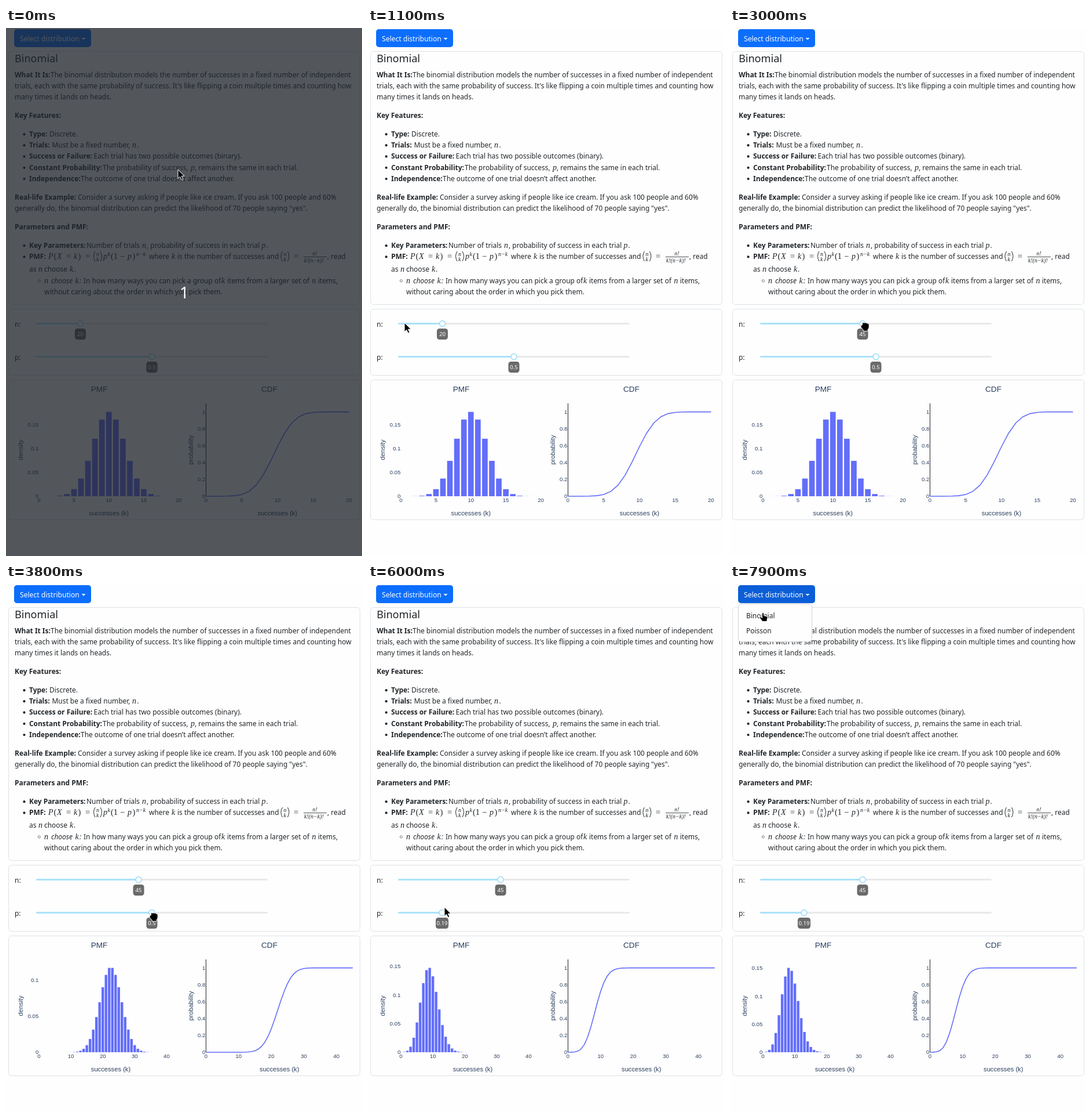
These frames come from a looping animation (615x910 px, 8000 ms). An HTML page:

```html
<!DOCTYPE html>
<html lang="en">
<head>
<meta charset="utf-8">
<title>Binomial distribution explorer</title>
<style>
html, body { margin: 0; width: 100%; height: 100%; overflow: hidden; background: #fefefe; }
svg { display: block; width: 615px; height: 910px; }
text { font: 11.95px "Noto Sans", sans-serif; fill: #212529; }
.b { font-weight: 700; }
.i { font-style: italic; }
.h { font-size: 18.1px; }
.w { fill: #fff; font-size: 12.1px; }
.m { font: italic 14px "Liberation Serif", serif; }
.r { font: 14.5px "Liberation Serif", serif; }
.s { font: italic 10px "Liberation Serif", serif; }
.tip { font-size: 9.6px; fill: #fff; text-anchor: middle; }
.tick, .axis, .title { font: 9.6px "Liberation Sans", Arial, sans-serif; fill: #2a3f5f; text-anchor: middle; }
.end { text-anchor: end; }
.axis { font-size: 11.2px; }
.title { font-size: 13.6px; }
.count { font-size: 28px; fill: #fff; text-anchor: middle; }
.card { fill: none; stroke: #dee2e6; }
</style>
</head>
<body>
<svg viewBox="0 0 615 910"><g id="page"></g><g id="live"></g></svg>
<script>
const text = (x, y, s, cls = '', extra = '') => `<text x="${x}" y="${y}" class="${cls}" ${extra}>${s}</text>`;
const rect = (x, y, w, h, attrs) => `<rect x="${x}" y="${y}" width="${w}" height="${h}" ${attrs}/>`;
const path = (d, attrs) => `<path d="${d}" ${attrs}/>`;
const card = (y, h) => rect(4.5, y + .5, 607, h, 'rx="5" class="card"');

// A line is a list of [x, string, class] runs on one baseline.
const line = (y, ...runs) => runs.map(([x, s, c]) => text(x, y, s, c)).join('');
const bullet = y => `<circle cx="31.5" cy="${y - 3.8}" r="2.1" fill="#212529"/>`;
const item = (y, ...runs) => bullet(y) + line(y, ...runs);
const choose = (x, y) =>
  path(`M${x + 4} ${y - 13}q-5 8 0 17M${x + 13} ${y - 13}q5 8 0 17`, 'fill="none" stroke="#212529"') +
  line(y - 5, [x + 6, 'n', 's']) + line(y + 4, [x + 6, 'k', 's']);

function article() {
  return text(15, 59, 'Binomial', 'h') +
    line(84.6, [15, 'What It Is:', 'b'], [77, 'The binomial distribution models the number of successes in a fixed number of independent']) +
    line(103.8, [15, "trials, each with the same probability of success. It's like flipping a coin multiple times and counting how"]) +
    line(123, [15, 'many times it lands on heads.']) +
    line(155, [15, 'Key Features:', 'b']) +
    item(187, [40, 'Type:', 'b'], [75, 'Discrete.']) +
    item(206, [40, 'Trials:', 'b'], [79.5, 'Must be a fixed number,'], [218, 'n', 'm'], [226.5, '.']) +
    item(225.2, [40, 'Success or Failure:', 'b'], [151.5, 'Each trial has two possible outcomes (binary).']) +
    item(244.6, [40, 'Constant Probability:', 'b'], [167, 'The probability of success,'], [319, 'p', 'm'],
      [326, ', remains the same in each trial.']) +
    item(263.8, [40, 'Independence:', 'b'], [129, 'The outcome of one trial doesn’t affect another.']) +
    line(296, [15, 'Real-life Example:', 'b'], [124, 'Consider a survey asking if people like ice cream. If you ask 100 people and 60%']) +
    line(315, [15, 'generally do, the binomial distribution can predict the likelihood of 70 people saying "yes".']) +
    line(347, [15, 'Parameters and PMF:', 'b']) +
    item(379, [40, 'Key Parameters:', 'b'], [139, 'Number of trials'], [235, 'n', 'm'],
      [243, ', probability of success in each trial'], [441.5, 'p', 'm'], [449.5, '.']) +
    item(398.2, [40, 'PMF:', 'b'], [73, 'P', 'm'], [82.5, '(', 'r'], [88, 'X', 'm'], [104, '=', 'r'], [117, 'k', 'm'],
      [124.5, ')', 'r'], [137, '=', 'r'], [168, 'p', 'm'], [181, '(1', 'r'], [197, '−', 'r'], [210, 'p', 'm'], [218.5, ')', 'r'],
      [247, 'where'], [286, 'k', 'm'], [296, 'is the number of successes and'], [497, '=', 'r'], [555, ', read']) +
    line(392.6, [175.5, 'k', 's'], [225, 'n−k', 's']) + choose(150, 398) + choose(473.5, 398) +
    line(392, [529.5, 'n!', 's']) + rect(514, 394, 40, .8, 'fill="#212529"') +
    line(403.5, [515, 'k!(n−k)!', 's']) +
    line(419.6, [40, 'as'], [56, 'n', 'm'], [66, 'choose'], [110, 'k', 'm'], [117, '.']) +
    '<circle cx="57.3" cy="435.8" r="2" fill="none" stroke="#555" stroke-width=".8"/>' +
    line(439.6, [66, 'n', 'm'], [78, 'choose', 'i'], [119.5, 'k', 'm'], [127, ':', 'i'],
      [134, 'In how many ways you can pick a group of'], [372, 'k', 'm'], [382, 'items from a larger set of'],
      [528.5, 'n', 'm'], [539, 'items,']) +
    line(458.8, [66, 'without caring about the order in which you pick them.']);
}

const vertical = (x, s) => text(x, 727, s, 'axis', `transform="rotate(-90 ${x} 727)"`);
page.innerHTML = rect(0, 0, 615, 910, 'fill="#fefefe"') + card(40, 436) + card(484, 114) + card(606, 241) + article() +
  text(15, 515, 'n:') + text(15, 572, 'p:') +
  text(161, 627, 'PMF', 'title') + text(455, 627, 'CDF', 'title') + vertical(29, 'density') + vertical(323, 'probability');

// Linear interpolation through [time, value, value, ...] keys.
function at(keys, t) {
  let i = 0;
  while (i < keys.length - 1 && keys[i + 1][0] <= t) i++;
  const a = keys[i], b = keys[i + 1] || a;
  const f = b === a ? 0 : Math.max(0, (t - a[0]) / (b[0] - a[0]));
  return a.map((v, j) => typeof v === 'number' ? v + (b[j] - v) * f : v);
}

function slider(y, f, label) {
  const x = 52 + 400 * f, w = Math.max(19, label.length * 5.5);
  return rect(52, y - 1.6, 400, 3.2, 'rx="1.6" fill="#e9e9e9"') +
    rect(52, y - 1.6, 400 * f, 3.2, 'rx="1.6" fill="#abe2fb"') +
    `<circle cx="${x}" cy="${y}" r="5" fill="#fff" stroke="#96dbfa" stroke-width="1.4"/>` +
    rect(x - w / 2, y + 8.5, w, 19, 'rx="4.5" fill="#6a6a6a"') + text(x, y + 21.3, label, 'tip');
}

const BASE = 807, TALL = 145.4;

function charts(n, p) {
  const pmf = [(1 - p) ** n];
  for (let k = 1; k <= n; k++) pmf.push(pmf[k - 1] * (n - k + 1) / k * p / (1 - p));
  const step = n > 20 ? 10 : 5, extra = n > 20 ? 6.5 : 0;
  const dx = (241.5 + extra) / n, dx2 = (247 + extra) / n;
  const unit = TALL / Math.max(...pmf);
  let out = '', sum = 0, curve = '';
  pmf.forEach((v, k) => {
    sum += v;
    const x = 57 + k * dx, w = dx * .8, left = Math.max(57, x - w / 2);
    out += rect(left, BASE - v * unit, x + w / 2 - left, v * unit, 'fill="#636efa"');
    curve += `${k ? 'L' : 'M'}${345.5 + k * dx2} ${BASE - sum * TALL}`;
  });
  out += rect(345, 647, 1, 160, 'fill="#222"') + path(curve, 'fill="none" stroke="#636efa" stroke-width="1.6"');
  for (let v = 0; v * unit < 160; v += .05) out += text(56.3, BASE + 3.4 - v * unit, +v.toFixed(2), 'tick end');
  for (let v = 0; v < 6; v++) out += text(344.3, BASE + 3.4 - v * TALL / 5, v / 5, 'tick end');
  for (let k = 0; k <= n; k += step)
    out += text(57 + k * dx, 817, k, 'tick') + text(345.5 + k * dx2, 817, k, 'tick');
  return out + text(57 + n * dx / 2, 840, 'successes (k)', 'axis') + text(345.5 + n * dx2 / 2, 840, 'successes (k)', 'axis');
}

const solid = 'fill="#000" stroke="#fff" stroke-width="1" stroke-linejoin="round"';
const pointers = {
  arrow: path('M0 0V15.5L3.6 12.2 6.2 17.8 8.8 16.6 6.3 11.2H11.2Z', solid),
  beam: path('M-2.5-6.5H2.5M0-6.5V6.5M-2.5 6.5H2.5', 'fill="none" stroke="#222"'),
  hand: path('M-1.5 1Q0-1 1.5 1V5L6 6Q8 6.5 8 8.5L7 12V15H-1L-5.5 9Q-6 7-4 7L-1.5 9Z', solid),
  grab: path('M-6 8q0-3 2.5-2v-3q1.5-3 3-.5 1.8-2 3.2 0 2-1.2 3 .8 2.5-.2 2.5 2v4q0 3-2 4v3h-8v-2l-4-4.5z', solid)
};

const moves = [
  [0, 297, 244, 'arrow'], [100, 297, 246, 'beam'], [300, 297, 246, 'beam'], [900, 100, 470, 'arrow'],
  [1100, 63, 508, 'arrow'], [1200, 117, 506, 'arrow'], [1300, 117, 506, 'arrow'], [1500, 129, 507, 'arrow'],
  [2100, 129, 507, 'arrow'], [2200, 134, 508, 'arrow'], [2300, 144, 506, 'grab'], [3000, 232, 506, 'grab'],
  [3200, 232, 506, 'grab'], [3800, 254, 565, 'grab'], [4100, 254, 565, 'grab'], [4900, 344, 565, 'grab'],
  [5300, 344, 565, 'grab'], [5900, 131, 565, 'grab'], [6000, 132, 557, 'arrow'], [6300, 132, 557, 'arrow'],
  [6550, 90, 440, 'beam'], [6900, 30, 200, 'beam'], [7200, 58, 26, 'hand'], [7300, 55, 20, 'hand'],
  [7500, 55, 20, 'hand'], [7900, 57, 49.5, 'hand']
];
const nKeys = [[2200, 20], [3000, 45]];
const pKeys = [[4100, .5], [4900, .72], [5300, .72], [5900, .19]];

function draw(t) {
  const n = Math.round(at(nKeys, t)[1]), p = Math.round(at(pKeys, t)[1] * 100) / 100;
  // The charts only catch up when a drag pauses.
  const shownP = t < 5000 ? .5 : t < 6000 ? .72 : t < 6100 ? .2 : .19;
  const [, x, y, kind] = at(moves, t);
  let out = rect(14, 2, 133, 31, `rx="4.8" fill="${t < 7300 ? '#0d6efd' : '#0b5ed7'}"`) +
    text(24, 22.8, 'Select distribution', 'w') + path('M130.5 17H137.5L134 20.5Z', 'fill="#fff"') +
    slider(509.5, (n - 1) / 99 * .996, String(n)) + slider(566.5, p, String(p)) + charts(t < 3100 ? 20 : 45, shownP);
  if (t >= 7600) out += rect(14.5, 34.5, 127, 65, 'rx="5" fill="#fefefe" stroke="#d0d2d4"') +
    text(28, 59, 'Binomial') + text(28, 85, 'Poisson');
  if (t < 100) out += rect(0, 0, 615, 910, 'fill="#1d232a" opacity=".76"') + text(308, 466, '1', 'count');
  live.innerHTML = out + `<g transform="translate(${x} ${y})">${pointers[kind]}</g>`;
}

let last = -1;
const start = performance.now();
function tick() {
  const t = Math.floor((performance.now() - start) % 8000 / 100) * 100;
  if (t !== last) draw(last = t);
  requestAnimationFrame(tick);
}
tick();
</script>
</body>
</html>
```
